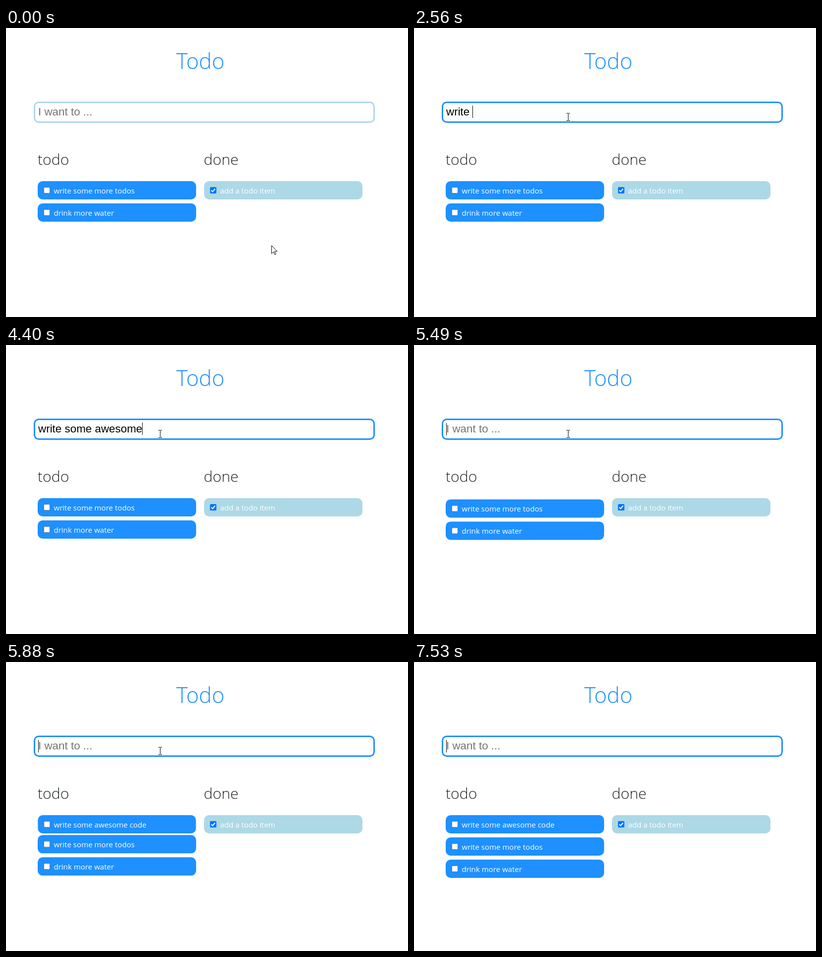
Animation of 812x585 px, one loop 8 s. Source, as an HTML page:

```html
<!DOCTYPE html>
<html lang="en">
<head>
<meta charset="utf-8">
<title>Todo</title>
<style>
  html, body { margin: 0; width: 100%; height: 100%; overflow: hidden; background: #fff; }
  svg { display: block; }
  text { white-space: pre; }
  .title, .head { font-family: "Open Sans", "Noto Sans", sans-serif; font-weight: 300; }
  .title { font-size: 43.8px; fill: #1e90ff; text-anchor: middle; }
  .head { font-size: 30.2px; fill: #212529; }
  .field { font: 22.4px "Liberation Sans", Arial, sans-serif; }
  .item text { font: 15.1px "Open Sans", "Noto Sans", sans-serif; fill: #fff; }
</style>
</head>
<body>
<svg id="stage" width="812" height="585" viewBox="0 0 812 585">
  <text class="title" x="392.7" y="82.5">Todo</text>
  <rect id="box" x="57.5" y="150.5" width="686" height="40" rx="8.5" fill="#fff" stroke-width="3"/>
  <text id="field" class="field" x="65" y="177"></text>
  <rect id="caret" width="1" height="25"/>
  <text class="head" x="64" y="277">todo</text>
  <text class="head" x="399.5" y="277">done</text>
  <g id="items"></g>
  <g id="arrow">
    <path d="M.5 .5v16.2l3.8-3.6 2.6 5.7 2.2-1-2.5-5.6h5.2z" fill="#fff" stroke="#000"/>
  </g>
  <g id="beam">
    <path d="M0 .5H3M4 .5H7M3.5 1V15M0 15.5H3M4 15.5H7" fill="none" stroke="#000"/>
  </g>
</svg>
<script>
const LOOP = 8000, FOCUS = 590, SUBMIT = 5490;
const HINT = 'I want to ...', TASK = 'write some awesome code';
const $ = id => document.getElementById(id);

// moment at which each letter of TASK appears
const keys = [1480, 1780, 1880, 2170, 2270, 2560, 2750, 2850, 2940, 3040, 3130, 3420,
  3620, 3810, 4010, 4110, 4200, 4400, 4500, 4700, 4800, 4990, 5090];

// moments at which the list is redrawn while it moves
const ticks = [5490, 5590, 5680, 5780, 5880, 5980, 6070, 6170, 6270];

// moments at which the caret turns on or off, starting with on
const blinks = [FOCUS, 1090, 1480, 5980, 6540, 7030, 7530];

// time, pointer shape, x, y
const pointer = [
  [0, 'arrow', 536, 440], [100, 'arrow', 418, 290], [200, 'arrow', 302, 146],
  [400, 'beam', 308, 172], [6360, 'beam', 288, 175], [6460, 'arrow', 215, 212],
  [6560, 'arrow', 130, 246], [6640, 'arrow', 62, 274], [6730, 'arrow', 17, 292],
  [6830, 'none', 0, 0]
];

const measure = document.createElement('canvas').getContext('2d');
measure.font = '22.4px "Liberation Sans", Arial, sans-serif';

const passed = (list, t) => list.filter(at => at <= t).length;
const easeOut = (p, power) => 1 - (1 - Math.min(1, Math.max(0, p))) ** power;

function addItem(label, done) {
  const g = document.createElementNS('http://www.w3.org/2000/svg', 'g');
  g.setAttribute('class', 'item');
  const tick = done
    ? '<rect x="12" y="12" width="13" height="13" rx="2" fill="#0075ff"/>' +
      '<path d="M14.6 18.6l2.7 2.7 5-5.8" fill="none" stroke="#fff" stroke-width="2"/>'
    : '<rect x="12.5" y="12.5" width="12" height="12" rx="2" fill="#fff" stroke="#767676"/>';
  g.innerHTML = `<rect width="320" height="37" rx="10" fill="${done ? '#add8e6' : '#1e90ff'}"/>` +
    tick + `<text x="32.4" y="25">${label}</text>`;
  $('items').append(g);
  return g;
}

const fresh = addItem(TASK);
const first = addItem('write some more todos');
const second = addItem('drink more water');
const finished = addItem('add a todo item', true);

const place = (el, x, y, scale = 1) =>
  el.setAttribute('transform', `translate(${x} ${y}) scale(${scale})`);
const show = (el, on) => el.setAttribute('visibility', on ? 'visible' : 'hidden');

place(finished, 400, 310);

function drawField(t) {
  const typed = t < SUBMIT ? TASK.slice(0, passed(keys, t)) : '';
  $('box').setAttribute('stroke', t < FOCUS ? '#add8e6' : '#1e90ff');
  $('field').textContent = typed || HINT;
  $('field').setAttribute('fill', typed ? '#000' : '#757575');
  $('caret').setAttribute('x', 65 + Math.round(measure.measureText(typed).width));
  $('caret').setAttribute('y', typed ? 157 : 158);
  show($('caret'), passed(blinks, t) % 2);
}

function drawList(t) {
  const n = passed(ticks, t);
  const now = n ? ticks[n - 1] : 0;
  const settled = n === ticks.length;
  const grow = settled ? 1 : easeOut((now - 5455) / 600, 5);
  const shift = 45 * easeOut((now - 5476) / 760, 3);
  show(fresh, n > 0);
  fresh.setAttribute('opacity', grow);
  place(fresh, 64 + 160 * (1 - grow), 310 + 18.5 * (1 - grow), grow);
  place(first, 64, 310 + shift);
  place(second, 64, 355 + shift);
}

function drawPointer(t) {
  const [, shape, x, y] = pointer.filter(p => p[0] <= t).pop();
  for (const id of ['arrow', 'beam']) {
    show($(id), id === shape);
    place($(id), x, y);
  }
}

function draw() {
  const t = performance.now() % LOOP;
  drawField(t);
  drawList(t);
  drawPointer(t);
  requestAnimationFrame(draw);
}
draw();
</script>
</body>
</html>
```
